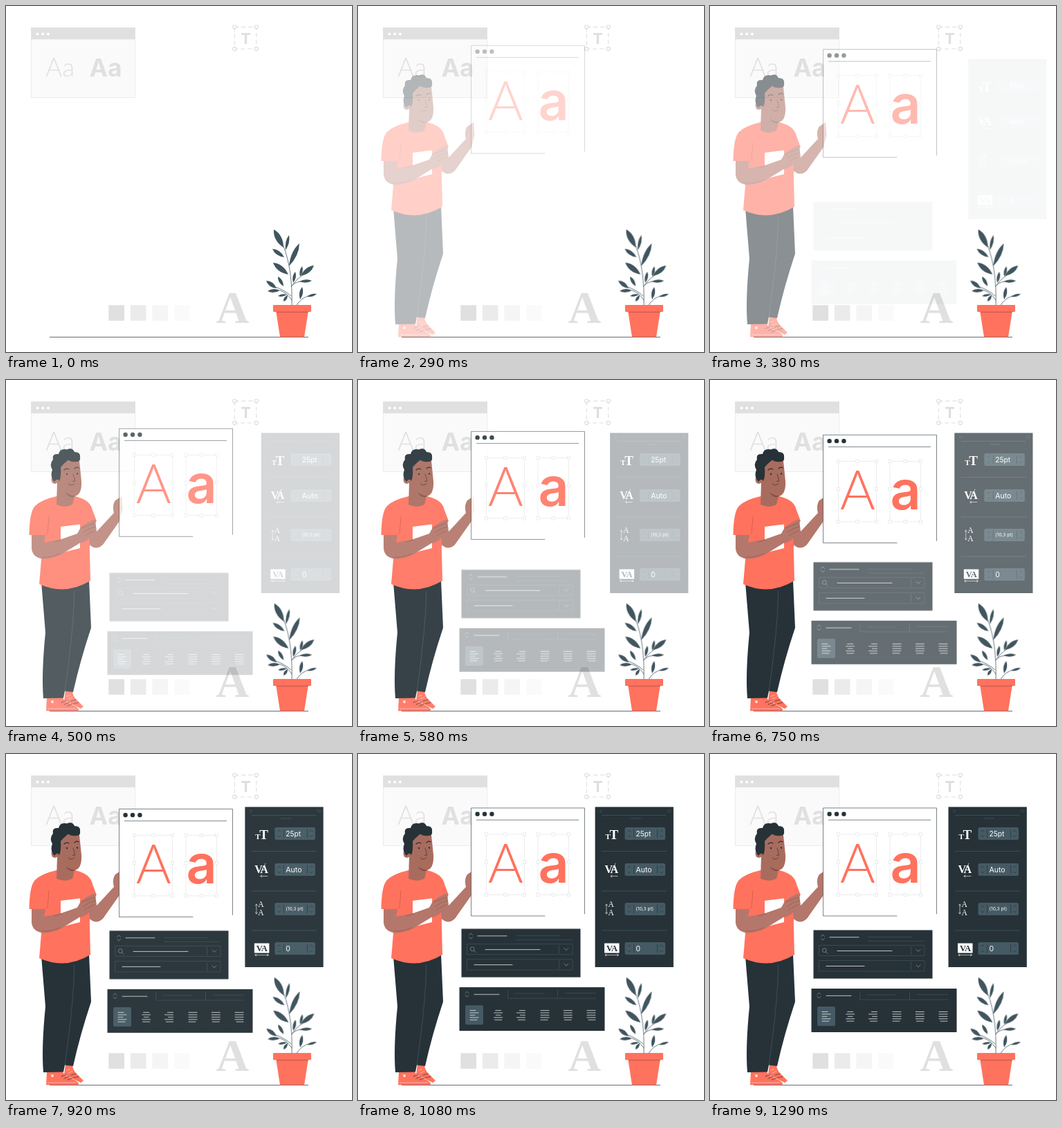
An HTML page for the animation above (1330 ms loop, 500 by 500 pixels).

```html
<!DOCTYPE html>
<html lang="en">
<head>
<meta charset="utf-8">
<title>Typography tools</title>
<style>
html, body { margin: 0; width: 100%; height: 100%; overflow: hidden; background: #fff; }
svg { display: block; width: 100vw; height: 100vh; }
text { font-family: Inter, "Open Sans", sans-serif; }
.light { font-family: Lato, sans-serif; font-weight: 300; }
.serif { font-family: "Liberation Serif", serif; font-weight: 700; }
.thin { font-weight: 400; }
.line { fill: none; stroke-linecap: round; stroke-linejoin: round; }

#person { animation: fade 1330ms infinite, hold 1330ms step-end infinite; }
#page { --y: -30px; animation: early 1330ms infinite, hold 1330ms step-end infinite; }
.panel { animation: late 1330ms infinite; }
#values { --x: 30px; }
#search, #align { --y: 30px; }
#stems { transform-origin: 413px 432px; animation: sway 1330ms infinite; }

@keyframes hold { 0% { visibility: hidden; } 9.77%, 100% { visibility: visible; } }
@keyframes fade {
  0% { opacity: 0; animation-timing-function: cubic-bezier(.36, -.01, .5, 1.38); }
  71.5%, 100% { opacity: 1; }
}
@keyframes early {
  0% { opacity: 0; transform: translate(var(--x, 0px), var(--y, 0px)); animation-timing-function: cubic-bezier(.36, -.01, .5, 1.38); }
  75.5%, 100% { opacity: 1; transform: translate(0px, 0px); }
}
@keyframes late {
  0%, 20.3% { opacity: 0; transform: translate(var(--x, 0px), var(--y, 0px)); animation-timing-function: cubic-bezier(.36, -.01, .5, 1.38); }
  95.5%, 100% { opacity: 1; transform: translate(0px, 0px); }
}
@keyframes sway { 0% { transform: rotate(0deg); } 45%, 100% { transform: rotate(.4deg); } }
</style>
</head>
<body>
<svg viewBox="0 0 500 500">
  <g id="backdrop">
    <rect x="36.5" y="31.5" width="150" height="101" fill="#fafafa" stroke="#e6e6e6" stroke-width=".7"/>
    <rect x="36.2" y="31.2" width="150.6" height="17" fill="#e0e0e0"/>
    <g fill="#fff"><circle cx="45.5" cy="40.5" r="2"/><circle cx="53.3" cy="40.5" r="2"/><circle cx="61" cy="40.5" r="2"/></g>
    <g fill="#e0e0e0">
      <text class="light" x="57" y="102" font-size="37">Aa</text>
      <text x="120.5" y="102" font-size="35.5" font-weight="700">Aa</text>
    </g>
    <rect x="330.3" y="30.3" width="31.5" height="31.7" fill="none" stroke="#e0e0e0" stroke-width="1.2" stroke-dasharray="6 4"/>
    <g id="knobs" fill="#fff" stroke="#dcdcdc" stroke-width="1.1"></g>
    <text x="346.5" y="54.5" text-anchor="middle" font-size="22" font-weight="700" fill="#dedede">T</text>
    <rect x="148.3" y="432.3" width="22.7" height="22.5" fill="#e0e0e0"/>
    <rect x="179.8" y="432.3" width="22.7" height="22.5" fill="#ebebeb"/>
    <rect x="211.3" y="432.3" width="22.7" height="22.5" fill="#f5f5f5"/>
    <rect x="242.8" y="432.3" width="22.7" height="22.5" fill="#fafafa"/>
    <text class="serif" x="327.3" y="457.5" text-anchor="middle" font-size="66" fill="#e0e0e0">A</text>
  </g>

  <path d="M63 478.5H437" stroke="#263238" stroke-width=".7"/>
  <g id="plant">
    <g id="stems">
      <path class="line" stroke="#455a64" stroke-width=".8" d="M413 432C414 400 410 370 401 347M413 405Q418 396 430 388M412 419Q402 410 389 406M413 425Q406 414 396 411M419 434Q426 421 440 418M414 403Q420 398 428 398"/>
      <g id="leaves" fill="#40555f"></g>
    </g>
    <path d="M390 440H437L431 478.3H396Z" fill="#ff725e"/>
    <rect x="386" y="432" width="55" height="10" rx="1" fill="#ff725e"/>
    <path d="M391 442.3H437" stroke="#a34a40" stroke-width=".7"/>
  </g>

  <g id="person">
    <g fill="#ff725e">
      <path d="M86 449L96 450Q97 458 103 463L112 472L108 475L84 463Z"/>
      <path d="M59 459H82L85 464L101 472Q107 476 104 478.3H58Z"/>
    </g>
    <path class="line" d="M60 475H101M88 457L93 455.500M90 461L96 458.500" stroke="#fff" stroke-opacity=".65" stroke-width=".7"/>
    <path class="line" d="M80 466L87 463.500M84 469L91 466M89 471L95 468.500M94 464L101 462M97 468L105 466" stroke="#263238" stroke-width=".7"/>
    <circle cx="67" cy="465" r="1.900" fill="#fff" fill-opacity=".8"/>
    <path d="M51 292L120 289L123 358Q107 406 97 451L85 449.500L83 459.500L54 460Q51 425 57 365Z" fill="#263238"/>
    <path class="line" d="M98.500 305Q99 350 85 450" stroke="#50606a" stroke-width=".6"/>
    <path d="M119 205L129 203L131 219L156 192C154 184 155 178 158 174L167 168L168.500 186L164 204L140 238Q130 247 121 238Z" fill="#b4776b"/>
    <path d="M73 168L100 168Q122 173 125 188L131 204L120 208L122 290Q86 312 48 295L54 224H33.500Q34 190 42 182Q51 173 73 168Z" fill="#ff725e"/>
    <path class="line" d="M62 198L60 222M120 206L121 240" stroke="#c94f40" stroke-width=".6"/>
    <path d="M79 212L107 208.500V243L79 250Z" fill="#fff"/>
    <path d="M37 224H57L55 235L80 230L103 222L108 213L118 206L127 201.500Q132 202 129 207L130 214Q128 222 122 227Q116 234 106 236L80 252Q62 260 50 258Q36 254 37 240Z" fill="#b4776b"/>
    <path class="line" d="M109 214L119 210L128 207M112 220L120 215L129 212M114 225L121 221L127 218M80 231L70 234M52 256Q66 257 78 251" stroke="#8f584d" stroke-width=".7"/>
    <g fill="#a86c5e">
      <ellipse cx="70.500" cy="144" rx="5" ry="6"/>
      <path d="M77 119Q94 111 106 117L109 146Q110 166 99 168L96 180Q85 186 73 180L74 148Z"/>
    </g>
    <path d="M86 162Q92 168 101 167.500Q92 172 86 162Z" fill="#754a40"/>
    <path d="M70 147Q63 139 67 130Q62 121 68 115Q66 106 76 107Q78 98 88 100.500Q96 97 99 104Q108 104 107 112Q108 118 102 118Q94 119 90 115.500Q83 121 79 126Q80 140 77 146Q74 141 70 147Z" fill="#263238"/>
    <path class="line" d="M84 130Q87 127 91 129M99 128Q102 125 105 127" stroke="#263238" stroke-width="1.200"/>
    <g fill="#263238"><circle cx="88" cy="136" r="1.200"/><circle cx="103" cy="135.500" r="1.200"/></g>
    <path class="line" d="M97 136L100 146L96 146.500M90 150Q94 154 99 150" stroke="#5a342d" stroke-width=".8"/>
  </g>

  <g id="page">
    <rect x="163.500" y="78" width="164" height="156" fill="#fff"/>
    <path class="line" d="M270 234H163.500V78H327.500V231" stroke="#263238" stroke-width=".6"/>
    <path d="M171 95.300H319" stroke="#263238" stroke-width=".6"/>
    <g fill="#263238"><circle cx="172.600" cy="86.800" r="3.200"/><circle cx="183" cy="86.800" r="3.200"/><circle cx="193.400" cy="86.800" r="3.200"/></g>
    <g id="frames" fill="#fff" stroke="#e0e0e0" stroke-width=".6"></g>
    <g fill="#ff725e" text-anchor="middle">
      <text class="light" x="213.300" y="185.500" font-size="78">A</text>
      <text x="282.500" y="185.500" font-size="77" font-weight="600">a</text>
    </g>
  </g>

  <g id="values" class="panel">
    <rect x="344.500" y="76.500" width="113.300" height="231.500" fill="#263238"/>
    <path d="M354 88.500H447M354 140.500H448M354 198H448M354 255H448M396 93H411" stroke="#455a64" stroke-width=".7"/>
    <path class="line" d="M351 80.500L355 84.500M355 80.500L351 84.500M449 81H454M449 83.500H454" stroke="#455a64" stroke-width=".6"/>
    <g id="fields"></g>
    <g fill="#fff">
      <text class="serif" x="359.500" y="123" font-size="11">T</text>
      <text class="serif" x="365.500" y="123" font-size="19">T</text>
      <text class="serif" x="358.500" y="172" font-size="16" letter-spacing="-1.500">VA</text>
      <text class="serif thin" x="363.500" y="220.500" font-size="11.500">A</text>
      <text class="serif thin" x="363.500" y="232.500" font-size="11.500">A</text>
      <rect x="358" y="273.500" width="21.500" height="14"/>
      <text class="serif" x="368.700" y="285" text-anchor="middle" font-size="12.500" letter-spacing="-.5" fill="#263238">VA</text>
    </g>
    <path class="line" d="M374 158L368 172M377 176.500H367M369 174.800L367 176.500L369 178.200M361 217V231M359.500 219L361 217L362.500 219M359.500 229L361 231L362.500 229M359 290.500H378.500M361 289L359 290.500L361 292M376.500 289L378.500 290.500L376.500 292" stroke="#fff" stroke-width=".6"/>
  </g>

  <g id="search" class="panel">
    <rect x="149.500" y="254.500" width="172" height="70" fill="#263238"/>
    <path d="M157.500 276.500H310V291.500H157.500ZM157.500 298.500H310V314H157.500ZM228 270.500H310M228 264.500H292M290.500 278V290M290.500 300V312.500" fill="none" stroke="#455a64" stroke-width=".6"/>
    <path class="line" d="M173 264.800H215M184 293.500M184 284.500H263M168 306.500H223" stroke="#e8eaeb" stroke-width=".8"/>
    <path class="line" d="M160.500 263.500L163 261L165.500 263.500M160.500 266.500L163 269L165.500 266.500M298 282.500L301 285.500L304 282.500M298 305L301 308L304 305M167.500 286L170 288.500" stroke="#82919a" stroke-width=".8"/>
    <circle cx="165.300" cy="283.700" r="2.900" fill="none" stroke="#82919a" stroke-width=".8"/>
  </g>

  <g id="align" class="panel">
    <rect x="146.500" y="339" width="210" height="63" fill="#263238"/>
    <path d="M216.500 343V355H344M288.500 343V355M227 348H268M299 347.500H343" fill="none" stroke="#455a64" stroke-width=".6"/>
    <path class="line" d="M168 349.300H204" stroke="#e8eaeb" stroke-width=".8"/>
    <path class="line" d="M155 347.500L157.500 345L160 347.500M155 350.500L157.500 353L160 350.500" stroke="#82919a" stroke-width=".8"/>
    <rect x="155" y="365" width="26" height="28" rx="2" fill="#455a64"/>
    <path id="rows" class="line" stroke="#fff" stroke-width=".7"/>
  </g>
</svg>
<script>
const $ = id => document.getElementById(id);
const fill = (id, parts) => { $(id).innerHTML = parts.join(''); };

fill('knobs', [330.3, 361.8].flatMap(x => [30.3, 62].map(y => `<circle cx="${x}" cy="${y}" r="2.6"/>`)));

// base x, base y, tip x, tip y, width
const leaves = [
  [401, 349, 387, 323, 8.5], [404, 353, 409, 331, 4.5], [409, 376, 424, 343, 7],
  [402, 363, 385, 351, 6], [408, 388, 386, 371, 8], [426, 390, 445, 375, 7],
  [425, 391, 428, 376, 4], [415, 400, 418, 384, 4.5], [424, 398, 442, 397, 4.5],
  [401, 405, 393, 391, 5], [391, 408, 376, 397, 6], [396, 411, 378, 412, 5],
  [406, 417, 393, 419, 3.5], [407, 418, 401, 427, 4], [425, 424, 428, 406, 5],
  [435, 420, 449, 416, 3.5]
];
fill('leaves', leaves.map(([bx, by, tx, ty, w]) => {
  const dx = tx - bx, dy = ty - by, k = w / Math.hypot(dx, dy);
  const side = s => `${bx + dx * .55 - s * dy * k} ${by + dy * .55 + s * dx * k}`;
  return `<path d="M${bx} ${by}Q${side(1)} ${tx} ${ty}Q${side(-1)} ${bx} ${by}"/>`;
}));

// Selection boxes with eight handles
fill('frames', [[185.5, 240.5], [260, 304.5]].map(([l, r]) => {
  const xs = [l, (l + r) / 2, r], ys = [116, 156, 203.5];
  const grips = ys.flatMap((y, j) => xs.map((x, i) =>
    i === 1 && j === 1 ? '' : `<rect x="${x - 2.2}" y="${y - 2.2}" width="4.4" height="4.4"/>`));
  return `<rect x="${l}" y="116" width="${r - l}" height="87.5" fill="none"/>` + grips.join('');
}));

const fields = [[115, '25pt', 10.2], [167, 'Auto', 10.5], [224, '(10,3 pt)', 6.7], [281, '0', 10.5]];
const steppers = [394, 440.5].map(x =>
  `M${x - 2} -3L${x} -5L${x + 2} -3M${x - 2} 3L${x} 5L${x + 2} 3`).join('');
fill('fields', fields.map(([y, label, size]) => `<g transform="translate(0 ${y})">
  <rect x="387.5" y="-9" width="58.5" height="18" rx="2.5" fill="#455a64"/>
  <path class="line" d="${steppers}M400.500 -6V6M434.500 -6V6" stroke="#263238" stroke-width=".7"/>
  <text x="403.5" y="${size * .36}" font-size="${size}" fill="#fff">${label}</text></g>`));

// Alignment icons: left, centre, right, then three justified
const lengths = [8, 12, 7, 12, 10];
$('rows').setAttribute('d', [168, 202.700, 235.500, 270, 303.300, 337].map((x, n) =>
  lengths.map((len, i) => {
    const w = n < 3 || i === 4 ? len : 12;
    const shift = (12 - w) * [0, .5, 1, 0, .5, 1][n];
    return `M${x - 6 + shift} ${372.5 + i * 3.4}h${w}`;
  }).join('')).join(''));
</script>
</body>
</html>
```
